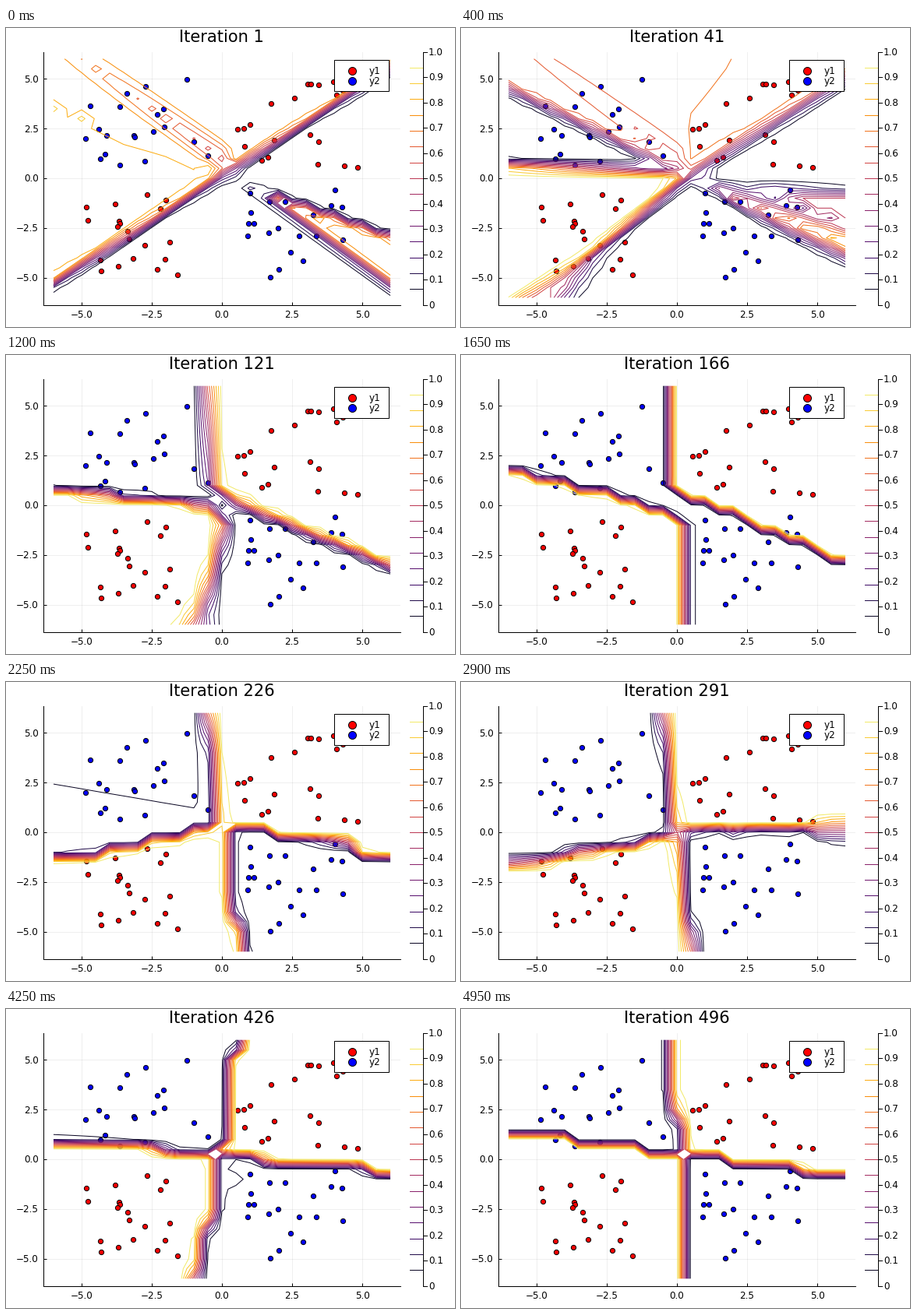
A matplotlib script for the animation above (5 s loop, 576 by 384 pixels).

```python
import numpy as np
import matplotlib.pyplot as plt
from matplotlib.animation import FuncAnimation
from matplotlib.patches import Rectangle

W, H = 576, 384
FRAMES, INTERVAL = 100, 50
LEFT, TOP, AX_W, AX_H = 48, 30.5, 458, 325
LIM = 6.36

plt.rcParams["font.family"] = "DejaVu Sans"

# Sample positions in stage pixels
RED = [
    (297, 130), (305, 128.5), (313.3, 123.7), (306, 152.3), (327.7, 170),
    (335.5, 165.7), (343.7, 144.4), (340.2, 96.5), (370, 89.6), (387.3, 72),
    (391.2, 71.5), (400.6, 73.3), (420, 69.3), (424, 86), (432, 79.8),
    (389.5, 137.4), (400.9, 146.2), (400.3, 175), (434, 176.6), (450.5, 179.4),
    (103, 230.2), (104.8, 247), (139.5, 226), (144.6, 248.2), (146.2, 250.5),
    (143.3, 254.6), (156.3, 260.7), (157.7, 271.3), (178.3, 279.4), (163, 296),
    (121.4, 298), (121.9, 311.5), (144, 305.7), (180.9, 213.5), (205, 221.3),
    (197.5, 232), (210.5, 275), (204, 297.2), (193.8, 309.7), (219.5, 316.5),
]
BLUE = [
    (108.4, 100.4), (146, 101.2), (154.6, 84.2), (178.5, 75.4), (232.5, 66.3),
    (202, 103.5), (194.3, 111.2), (203.4, 126.6), (188.8, 132.8), (164, 138),
    (165, 139.5), (118.8, 130), (128.7, 137.7), (102, 142.3), (127, 161.5),
    (121.2, 167.6), (146.4, 175.5), (177.7, 171), (240.5, 146.4), (259.3, 164.4),
    (313, 211.6), (313.8, 237.3), (310.5, 250.6), (317.8, 250.6), (309.8, 267),
    (338.3, 223.3), (358.3, 223.5), (336.7, 262.6), (348.9, 256.8), (376.3, 266.8),
    (398.2, 267), (365.3, 287.6), (380.5, 298.8), (350.2, 310), (338.5, 319.5),
    (394, 240), (417, 228.2), (431, 229.5), (422.4, 208.3), (431.5, 271.8),
]


def sig(z):
    return 1 / (1 + np.exp(-np.clip(z, -40, 40)))


def logit(p):
    p = np.clip(p, 1e-5, 1 - 1e-5)
    return np.log(p / (1 - p))


def poly(points, t):
    if np.isscalar(points):
        return points
    a, b = zip(*points)
    return np.interp(t, a, b)


def cross(x, y, up, down, left, right, k=(14, 14, 14, 14), join=0.5):
    """Four quadrants split by four arms; join=1 links the low regions."""
    u, d = k[0] * (x - poly(up, y)), k[1] * (x - poly(down, y))
    l, r = k[2] * (y - poly(left, x)), k[3] * (y - poly(right, x))
    high = np.maximum(np.minimum(u, r), np.minimum(-d, -l))
    low = np.maximum(np.minimum(-u, l), np.minimum(d, -r))
    return join * high - (1 - join) * low


# Decision surfaces, returned as logits

def first(x, y):
    rim = poly([(-6, 3.9), (-4.5, 2.9), (-3.5, 2.2), (-2, 1.6), (0, 0.4)], x)
    flat = 0.805 + 0.015 * np.clip(rim - y, -1, 1.5) * (x < 0.2)
    depth = np.clip(0.27 + 0.033 * x, 0, 0.27)
    valley = depth * np.exp(-((x + y - 1) / 0.65) ** 2) * (x < 0.3)
    top = (flat - valley) * sig(9 * (y - 0.1 - 0.9 * x))
    wedge = 0.8 * np.minimum(sig(14 * (0.1 - 0.5 * x - y)),
                             sig(6.5 * (y - 0.75 + 1.02 * x)))
    p = np.maximum(top, wedge)
    for cx, cy in ((-6, 3.5), (-5, 3), (-0.5, 0.5)):
        p = p + 0.09 * np.exp(-((x - cx) ** 2 + (y - cy) ** 2) / 0.03)
    return logit(p)


def fan(x, y):
    ridge = poly([(0, 0.4), (1, 1), (1.9, 1.5), (4.4, 3), (6, 3.9)], y)
    flat = 0.5625 + np.clip(0.012 * (x - ridge), -0.03, 0.06)
    upper = flat * sig(np.where(x < 0.3, 11 * (y - 0.5 + 0.64 * x), 20))
    lower = sig(np.maximum(6.5 * (0.3 + 0.53 * y - x), 8 * (y - 0.2 + 0.6 * x)))
    g = sig(16 * (0.25 - y))
    return logit(g * lower + (1 - g) * upper)


def linked(x, y):
    return cross(
        x, y, -0.25, 0.27,
        [(-6, 1.75), (-5.5, 1.7), (-5, 1.35), (-4, 1.2), (-3.5, 0.75), (-2.5, 0.7),
         (-2, 0.3), (-1.5, 0.2), (-1, -0.2), (-0.5, -0.25), (0, -0.7), (0.5, -1.2)],
        [(-0.5, 1.2), (0, 0.75), (0.5, 0.3), (1, 0.2), (1.5, -0.25), (2, -0.3),
         (2.5, -0.75), (3, -1.2), (3.5, -1.3), (4, -1.7), (4.5, -1.8), (5, -2.25),
         (5.5, -2.7), (6, -2.75)],
        k=(14, 10, 11, 13), join=1)


def bent(x, y):
    z = cross(
        x, y,
        [(1, -0.2), (4, -0.3), (6, -0.55)],
        [(-6, 0.75), (-5, 0.68), (-4, 0.33), (-3, 0.25)],
        [(-6, -1.22), (-4.5, -1.2), (-4, -0.8), (-3, -0.72), (-2.5, -0.3),
         (-1.5, -0.25), (-1, 0.15), (0, 0.25)],
        [(0.5, 0.25), (1.5, 0.22), (2, -0.2), (4.5, -0.5), (5, -1.15), (6, -1.25)],
        k=(9, 10, 9, 13))
    edge = 1.1 - 0.24 * (x + 0.5)
    return np.where(x < -0.4, np.maximum(z, -2.708 + 0.2 * (edge - y)), z)


def upright(x, y):
    return cross(
        x, y, -0.25, -0.25,
        [(-6, -1.25), (-5, -1.2), (-4.5, -1.05), (-4, -0.75), (-2, -0.72),
         (-1.5, -0.65), (-1, -0.3), (-0.5, -0.25)],
        [(0, 0.2), (1, 0.22), (1.5, 0.35), (2, 0.4), (2.5, 0.75), (4, 0.77),
         (4.5, 0.95), (5, 1.25)],
        k=(14, 14, 12, 11))


def swirl(x, y):
    z = cross(
        x, y,
        [(0.5, -0.1), (1, 0.22), (4.5, 0.25), (5, 0.3), (5.5, 0.6), (6, 0.75)],
        [(-6, -1), (-5, -0.78), (-4, -0.75), (-3, -0.4), (-2.5, -0.25)],
        [(-6, 0.82), (-3, 0.75), (-2.5, 0.6), (-2, 0.42), (-1.5, 0.28), (0, 0.25)],
        [(0, 0.25), (1, 0.2), (1.5, -0.05), (2, -0.22), (4.5, -0.25), (5, -0.38),
         (5.5, -0.72), (6, -0.75)],
        k=(12, 10, 11, 12))
    return np.maximum(z, -2 - 2 * np.hypot(x - 0.35, y + 1))


def crisp(x, y):
    return cross(
        x, y,
        [(0.5, 0.25), (1.5, 0.22), (2, 0.05), (2.5, -0.1), (3.5, -0.24)], 0.25,
        [(-4, 1.25), (-3.5, 0.75), (-1.5, 0.75), (-1, 0.27)],
        [(1.5, 0.25), (2, -0.25), (4, -0.3), (4.5, -0.6), (5, -0.75)],
        k=(10, 16, 16, 14))


KEYS = [(0, first), (16, fan), (33, linked), (45, bent),
        (70, upright), (85, swirl), (99, crisp)]
AXIS = np.linspace(-6, 6, 25)
GX, GY = np.meshgrid(AXIS, AXIS)
JITTER = np.random.default_rng(4).normal(0, 1, (FRAMES, 4)) * [0.12, 0.04, 0.12, 0.06]


def surface(i):
    n = next(j for j in range(len(KEYS) - 1) if i <= KEYS[j + 1][0])
    (t0, f), (t1, g) = KEYS[n], KEYS[n + 1]
    w = (i - t0) / (t1 - t0)
    a, b, c, d = JITTER[i] * min(1, (i - t0) / 3, (t1 - i) / 3)
    x, y = GX + a + b * GY, GY + c + d * GX
    z0, z1 = (np.clip(h(x, y), -12, 12) for h in (f, g))
    return sig((1 - w) * z0 + w * z1)


# One point equals one pixel at this dpi
fig = plt.figure(figsize=(W / 72, H / 72), dpi=72, facecolor="white")
ax = fig.add_axes([LEFT / W, 1 - (TOP + AX_H) / H, AX_W / W, AX_H / H])
ax.set(xlim=(-LIM, LIM), ylim=(-LIM, LIM))
ax.set_axisbelow(True)
ax.grid(color="black", alpha=0.08, lw=0.8)
ax.spines[["top", "right"]].set_visible(False)
ax.spines[["left", "bottom"]].set_linewidth(1)
ticks = [-5, -2.5, 0, 2.5, 5]
ax.set_xticks(ticks, [])
ax.set_yticks(ticks, [])
ax.tick_params(direction="in", length=4, width=1)

over = fig.add_axes([0, 0, 1, 1], zorder=3)
over.set(xlim=(0, W), ylim=(H, 0))
over.axis("off")


def label(x, y, s, ha="left", size=12):
    return over.text(x, y, s, ha=ha, va="baseline", fontsize=size)


def to_data(points):
    p = np.array(points)
    scale = 2 * LIM / np.array([AX_W, AX_H])
    return ((p - [LEFT, TOP]) * scale - LIM).T * [[1], [-1]]


def dots(axes, x, y, color, size):
    axes.plot(x, y, "o", ms=size, mfc=color, mec="black", mew=1)


for v in ticks:
    s = f"{v:.1f}".replace("-", "\u2212")
    label(LEFT + AX_W * (v + LIM) / (2 * LIM), 371.5, s, "center")
    label(42, TOP + AX_H * (LIM - v) / (2 * LIM) + 4.4, s, "right")

dots(ax, *to_data(RED), "red", 6.2)
dots(ax, *to_data(BLUE), "blue", 6.2)

# Colour scale
LEVELS = np.arange(1, 16) / 16
COLORS = plt.get_cmap("inferno")(LEVELS)
base = TOP + AX_H
for v, c in zip(LEVELS, COLORS):
    over.plot([518, 535], [base - AX_H * v] * 2, color=c, lw=1)
over.plot([535, 535], [TOP, base], color="black", lw=1)
for n in range(11):
    y = base - AX_H * n / 10
    over.plot([535, 540], [y, y], color="black", lw=1)
    label(542, y + 4.4, f"{n / 10:.1f}" if n else "0")

# Legend
over.add_patch(Rectangle((421, 41), 70, 39.5, fc="white", ec="black", lw=1, zorder=2))
for y, name, color in ((55, "y1", "red"), (68, "y2", "blue")):
    dots(over, [444], [y], color, 10)
    label(466, y + 4.2, name)

title = label(277, 18.5, "", "center", 21)
lines = []


def draw(i):
    while lines:
        lines.pop().remove()
    title.set_text(f"Iteration {1 + 5 * i}")
    lines.append(ax.contour(GX, GY, surface(i), levels=LEVELS, colors=COLORS,
                            linewidths=1, zorder=4))
    return [title]


anim = FuncAnimation(fig, draw, frames=FRAMES, interval=INTERVAL,
                     init_func=lambda: draw(0), repeat=True, repeat_delay=0)
plt.show()
```
